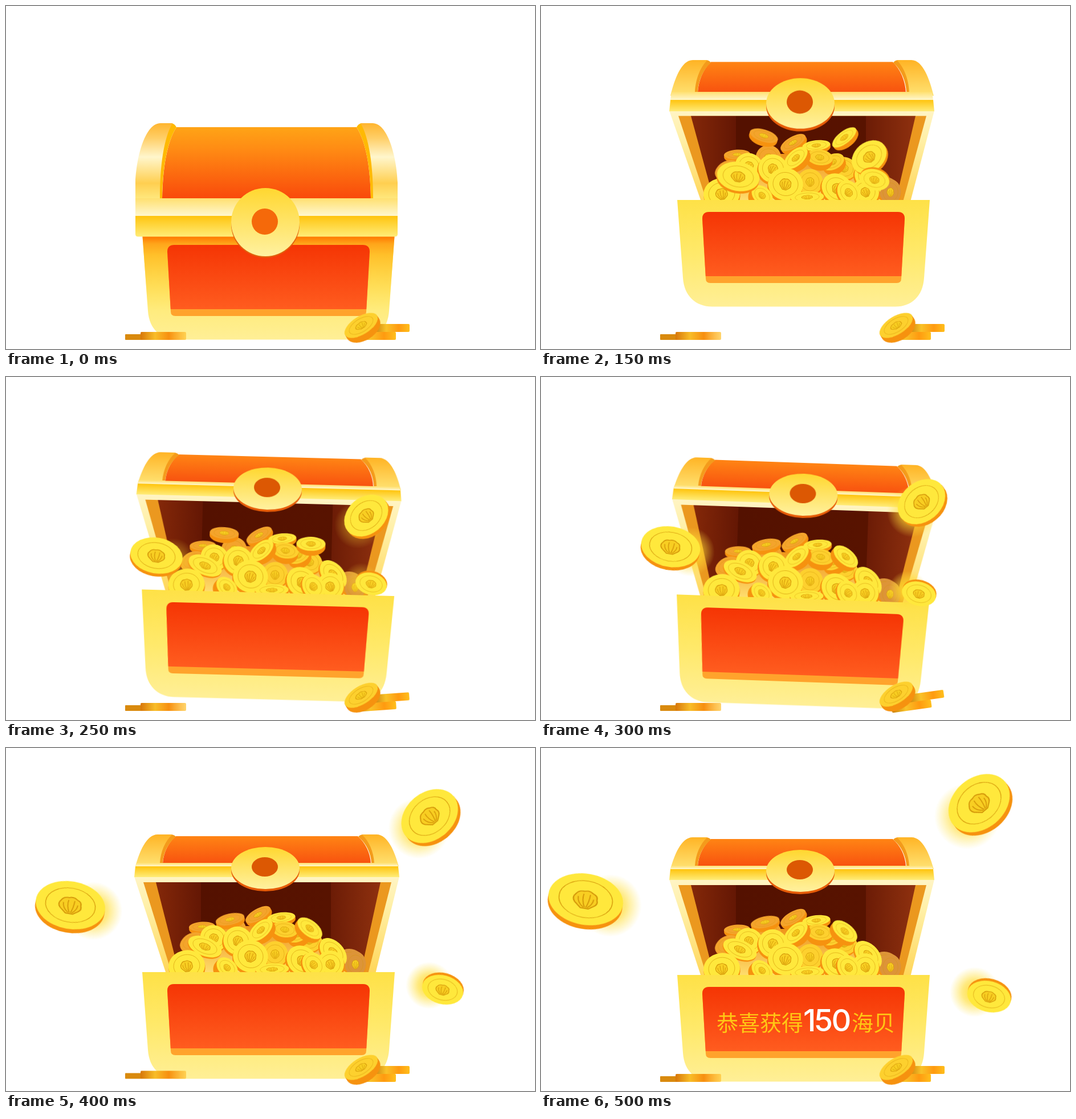
These frames come from a looping animation (928x603 px, 1500 ms). An HTML page without scripts:

```html
<!DOCTYPE html>
<html lang="zh">
<head>
<meta charset="utf-8">
<title>Treasure chest</title>
<style>
html, body { margin: 0; width: 100%; height: 100%; overflow: hidden; background: #fff; }
svg { display: block; width: 928px; height: 603px; color: #ffe83c; }

/* 50 ms ticks: steps(1) holds one tick, steps(2) adds a halfway pose */
.closed, .open, .prize, .chest, .lid, .fly, .glow, .hop, .bars, .tip, .jump {
  animation: 1.5s steps(1) infinite;
}
.closed { animation-name: closed; }
.open { animation-name: open; }
.prize { animation-name: prize; }
.chest { animation-name: chest; transform-origin: 458px 369px; }
.lid { animation-name: lid; }
.glow { animation-name: glow; }
.hop { animation-name: hop; }
.bars { animation-name: bars; transform-origin: 640px 572px; }
.tip { animation-name: tip; }
.back { animation-name: back; }
.side { animation-name: side; }
.left { animation-name: left; }
.right { animation-name: right; }
.small { animation-name: small; }

@keyframes closed { 0% { opacity: 1 } 6.66%, 100% { opacity: 0 } }
@keyframes open { 0% { opacity: 0 } 6.66%, 100% { opacity: 1 } }
@keyframes prize { 0% { opacity: 0 } 33.33%, 100% { opacity: 1 } }
@keyframes chest {
  0%, 6.66% { transform: translateY(-69.5px) rotate(-2deg) }
  10% { transform: translateY(-58px) rotate(0deg) }
  13.33% { transform: translateY(-30.5px) rotate(1deg); animation-timing-function: steps(2) }
  20% { transform: translateY(-9px) rotate(2deg); animation-timing-function: steps(2) }
  26.66% { transform: translateY(-5px) rotate(0deg); animation-timing-function: steps(2) }
  33.33%, 100% { transform: translateY(0) rotate(0deg) }
}
@keyframes lid {
  0%, 6.66% { transform: var(--a) }
  10% { transform: var(--b) }
  13.33%, 100% { transform: none }
}
@keyframes glow {
  0% { opacity: 0 }
  13.33% { opacity: 0; animation-timing-function: steps(2) }
  20%, 100% { opacity: 1 }
}
@keyframes hop {
  0%, 20% { transform: none; animation-timing-function: steps(2) }
  26.66% { transform: translateY(-5.5px); animation-timing-function: steps(2) }
  33.33%, 100% { transform: none }
}
@keyframes bars {
  0%, 13.33% { transform: rotate(0deg); animation-timing-function: steps(2) }
  20% { transform: rotate(-8deg); animation-timing-function: steps(2) }
  26.66%, 100% { transform: rotate(0deg) }
}
@keyframes tip {
  0%, 13.33% { transform: none; animation-timing-function: steps(2) }
  20% { transform: translateY(-4px); animation-timing-function: steps(2) }
  26.66%, 100% { transform: none }
}
@keyframes back {
  0%, 6.66% { transform: translate(386px, 301px) rotate(17deg) scale(.85, .36) }
  10% { transform: translate(391px, 286px) rotate(17deg) scale(.85, .36) }
  13.33% { transform: translate(369px, 286px) rotate(17deg) scale(.85, .36); animation-timing-function: steps(2) }
  20%, 100% { transform: translate(393px, 306px) rotate(-12deg) scale(.85, .33) }
}
@keyframes side {
  0%, 6.66% { transform: translate(531px, 308px) rotate(-38deg) scale(.85, .36) }
  10% { transform: translate(532px, 289px) rotate(-38deg) scale(.85, .36) }
  13.33% { transform: translate(534px, 300px) rotate(-38deg) scale(.85, .36); animation-timing-function: steps(2) }
  20%, 100% { transform: translate(533px, 322px) rotate(38deg) scale(.85, .46) }
}
@keyframes left {
  0%, 6.66% { transform: translate(369.5px, 302px) scale(.53) }
  10% { transform: translate(346px, 302px) scale(.57) }
  13.33% { transform: translate(300.5px, 332px) scale(.61); animation-timing-function: steps(2) }
  20% { transform: translate(227.5px, 301.5px) scale(.79); animation-timing-function: steps(2) }
  26.66% { transform: translate(113px, 280px) scale(.93); animation-timing-function: steps(2) }
  33.33%, 100% { transform: translate(78.5px, 270px) scale(1) }
}
@keyframes right {
  0%, 6.66% { transform: translate(551px, 278px) scale(.51) }
  10% { transform: translate(577px, 267px) scale(.57) }
  13.33% { transform: translate(598px, 270px) scale(.665); animation-timing-function: steps(2) }
  20% { transform: translate(669.5px, 221.5px) scale(.775); animation-timing-function: steps(2) }
  26.66% { transform: translate(745.5px, 122.5px) scale(.925); animation-timing-function: steps(2) }
  33.33%, 100% { transform: translate(771px, 100px) scale(1) }
}
@keyframes small {
  0%, 6.66% { transform: translate(570px, 310px) scale(.65) }
  10% { transform: translate(585px, 304px) scale(.68) }
  13.33% { transform: translate(618px, 345px) scale(.65); animation-timing-function: steps(2) }
  20% { transform: translate(663px, 379.5px) scale(.78); animation-timing-function: steps(2) }
  26.66% { transform: translate(766px, 423px) scale(.94); animation-timing-function: steps(2) }
  33.33%, 100% { transform: translate(786px, 435px) scale(1) }
}

.amber { color: #f4a42c; }
.gold { color: #fdd02e; }
.tan { color: #dd9438; }
text { font: 400 38px "Noto Sans CJK SC", "Noto Sans CJK", sans-serif; fill: #ffc814; }
.sum { font: 550 54px Inter, sans-serif; letter-spacing: -2.8px; fill: #fff; }
</style>
</head>
<body>
<svg viewBox="0 0 928 603" xmlns="http://www.w3.org/2000/svg">
<defs>
  <linearGradient id="frame" x2="0" y2="1"><stop stop-color="#fee147"/><stop offset=".5" stop-color="#ffe96a"/><stop offset="1" stop-color="#ffef96"/></linearGradient>
  <linearGradient id="panel" x2="0" y2="1"><stop stop-color="#f53504"/><stop offset="1" stop-color="#ff5c1f"/></linearGradient>
  <linearGradient id="shade" x2="0" y2="1"><stop stop-color="#ff7600"/><stop offset=".1" stop-color="#ffa51a"/><stop offset=".25" stop-color="#ffc02a"/><stop offset="1" stop-color="#ffd94e" stop-opacity="0"/></linearGradient>
  <linearGradient id="rail" x2="0" y2="1"><stop stop-color="#ffb52f"/><stop offset=".2" stop-color="#ffcf68"/><stop offset=".45" stop-color="#fff6cc"/><stop offset=".8" stop-color="#ffcf50"/><stop offset="1" stop-color="#ffe77c"/></linearGradient>
  <linearGradient id="dome" x2="0" y2="1"><stop stop-color="#ffa416"/><stop offset=".3" stop-color="#ff8c14"/><stop offset="1" stop-color="#f94a0b"/></linearGradient>
  <linearGradient id="dome2" x2="0" y2="1"><stop stop-color="#ff8414"/><stop offset="1" stop-color="#f8520f"/></linearGradient>
  <linearGradient id="rail2" x2="0" y2="1"><stop stop-color="#ffb425"/><stop offset="1" stop-color="#ffe374"/></linearGradient>
  <linearGradient id="pale" x2="0" y2="1"><stop stop-color="#ffe070"/><stop offset="1" stop-color="#fff8d2"/></linearGradient>
  <linearGradient id="band" x2="0" y2="1"><stop stop-color="#ffc40e"/><stop offset="1" stop-color="#ffec78"/></linearGradient>
  <linearGradient id="disc" x2="0" y2="1"><stop stop-color="#ffd730"/><stop offset="1" stop-color="#fff1a0"/></linearGradient>
  <linearGradient id="rim" x2="0" y2="1"><stop stop-color="#fff4c4"/><stop offset=".3" stop-color="#fff0a8"/><stop offset="1" stop-color="#ffd658"/></linearGradient>
  <linearGradient id="inner"><stop stop-color="#842809"/><stop offset=".2" stop-color="#641704"/><stop offset=".2" stop-color="#541100"/><stop offset=".78" stop-color="#581300"/><stop offset=".78" stop-color="#6c1c06"/><stop offset="1" stop-color="#8f310f"/></linearGradient>
  <linearGradient id="heap" x2="0" y2="1"><stop stop-color="#ef941a"/><stop offset="1" stop-color="#ffdf70"/></linearGradient>
  <linearGradient id="stack"><stop stop-color="#d8770a"/><stop offset=".32" stop-color="#f8bd28"/><stop offset=".62" stop-color="#f78f10"/><stop offset="1" stop-color="#ffc63c" stop-opacity=".75"/></linearGradient>
  <linearGradient id="stack2"><stop stop-color="#c9800c"/><stop offset=".35" stop-color="#f9c228"/><stop offset=".7" stop-color="#ff9a10"/><stop offset="1" stop-color="#ffbf1c"/></linearGradient>
  <radialGradient id="halo"><stop stop-color="#ffdc30"/><stop offset=".5" stop-color="#ffdc30" stop-opacity=".6"/><stop offset="1" stop-color="#ffe24a" stop-opacity="0"/></radialGradient>

  <path id="edge" d="M-30 0V5A30 30 0 0 0 30 5V0z" fill="#f6920f"/>
  <g id="face" stroke="#d39508">
    <circle r="30" fill="currentColor" stroke="none"/>
    <circle r="21.5" fill="none" stroke-width=".6"/>
    <g transform="scale(1.05 1.2)">
      <path d="M-3 9L-8 4Q-11 0-8-4Q-6-8-2-7.500Q2-9.500 5-6.500Q9-5 8.500-1Q10 3 7 5.500L3 9Z" fill="#f8ce22"/>
      <path d="M-1 8Q-6 4-6-2M0 8Q-3 1-2-5M1 8Q3 2 3-5M2 8Q6 4 6-1" fill="none" stroke-width=".8"/>
    </g>
  </g>
  <g id="coin"><use href="#edge"/><use href="#face"/></g>
  <g id="flat"><use href="#edge" transform="scale(1 1.25)" y="6"/><path d="M-30 0V9H30V0z" fill="#ec8210"/><use href="#face"/></g>

  <path id="front" d="M239 399H682L672 536C670 568 650 586.500 622 586.500H300C272 586.500 251 568 249 536Z" fill="url(#frame)"/>
  <g id="plate">
    <path d="M295 420H626Q638 420 638 432L632 537Q632 545 624 545H297Q289 545 289 537L283 432Q283 420 295 420Z" fill="#ffa32c"/>
    <path d="M295 420H626Q638 420 638 432L632.200 533H288.800L283 432Q283 420 295 420Z" fill="url(#panel)"/>
  </g>
  <g id="post">
    <path d="M280 206H290Q296 207 299 213C282 240 275 285 274 338H250V260Z" fill="#ffb904"/>
    <path d="M227 338V310C229 262 245 206 271 206H292C277 232 270 280 270 338Z" fill="url(#rail)"/>
  </g>
  <g id="post2">
    <path d="M276 157H288Q295 157 298 161C284 172 276 190 275 207H250Z" fill="#f49b1b"/>
    <path d="M227 213C234 188 246 157 266 157H292C279 168 271 188 270 207V213Z" fill="url(#rail2)"/>
  </g>
</defs>

<g class="closed">
  <use href="#front"/>
  <path d="M239.500 405H681.500L672 536H249Z" fill="url(#shade)"/>
  <use href="#plate"/>
  <path d="M274 338C275 285 282 240 299 213H615C632 240 639 285 640 338Z" fill="url(#dome)"/>
  <use href="#post"/>
  <use href="#post" transform="translate(914 0) scale(-1 1)"/>
  <path d="M227 338H687V370H227Z" fill="url(#pale)"/>
  <path d="M227 369H687V401Q687 405.500 682 405.500H232Q227 405.500 227 401Z" fill="url(#band)"/>
  <ellipse cx="455" cy="384" rx="60" ry="58.500" fill="#e2610c"/>
  <circle cx="455" cy="380" r="60" fill="url(#disc)"/>
  <circle cx="454" cy="379" r="23" fill="#f5690a"/>
</g>

<g class="open">
  <g class="chest">
    <g class="lid" style="--a:translateY(79px) scaleY(.802);--b:translateY(26.3px) scaleY(.934)">
      <path d="M225 231H690L648 402H281Z" fill="url(#rim)"/>
      <path d="M241 241H676L635 402H291Z" fill="#eb981f"/>
      <path d="M263 241H657L622 402H304Z" fill="url(#inner)"/>
    </g>

    <path d="M300 402L318 360L360 335L410 318H480L540 332L590 364L626 402Z" fill="url(#heap)"/>
    <g class="amber">
      <use href="#flat" transform="translate(344 319) rotate(-3) scale(.77 .28)"/>
      <use href="#coin" transform="translate(399 325) scale(.75)"/>
      <use href="#flat" transform="translate(442 298) rotate(-30) scale(.82 .34)"/>
      <g class="jump back"><use href="#flat"/></g>
      <use href="#coin" transform="translate(326 346) rotate(-30) scale(.75 .5)"/>
    </g>
    <g class="tan">
      <use href="#coin" transform="translate(605 378) rotate(20) scale(.8 .65)"/>
      <use href="#coin" transform="translate(613 385) scale(.62 .75)"/>
    </g>
    <use href="#flat" transform="translate(483 303) rotate(-6) scale(.82 .3)"/>
    <g class="gold">
      <use href="#coin" transform="translate(532 343) rotate(20) scale(.75 .65)"/>
      <use href="#flat" transform="translate(512 332) rotate(-25) scale(.7 .45)"/>
      <use href="#flat" transform="translate(489 324) rotate(8) scale(.78 .46)"/>
    </g>
    <g class="jump side"><use href="#flat"/></g>
    <use href="#coin" transform="translate(365 339) rotate(25) scale(.82 .74)"/>
    <use href="#flat" transform="translate(447 325) rotate(-42) scale(.83 .45)"/>
    <use href="#coin" transform="translate(407 344) rotate(30) scale(.87 .83)"/>
    <use href="#coin" transform="translate(349 354) rotate(22) scale(1.03 .55)"/>
    <use href="#coin" class="gold" transform="translate(472 367) scale(.75)"/>
    <use href="#coin" transform="translate(574 364) rotate(48) scale(.97 .62)"/>
    <use href="#coin" transform="translate(429 371) rotate(15) scale(1.03 .95)"/>
    <use href="#coin" transform="translate(317 388) rotate(-8) scale(1.07 .92)"/>
    <use href="#flat" transform="translate(388 391) rotate(42) scale(.7 .5)"/>
    <use href="#coin" transform="translate(520 379) rotate(40) scale(.98 .83)"/>
    <use href="#coin" transform="translate(569 385) rotate(-20) scale(.8)"/>
    <use href="#coin" transform="translate(540 386) rotate(55) scale(.78 .62)"/>
    <use href="#flat" transform="translate(467 394) rotate(-3) scale(.98 .34)"/>

    <use href="#front"/>
    <use href="#plate"/>

    <g class="lid" style="--a:translateY(-58.7px) scaleY(1.38);--b:translateY(-22.8px) scaleY(1.12)">
      <path d="M275 208C276 190 284 172 298 160H617C631 172 639 190 640 208Z" fill="url(#dome2)"/>
      <use href="#post2"/>
      <use href="#post2" transform="translate(916 0) scale(-1 1)"/>
    </g>
    <path class="lid" style="--a:translateY(-273.3px) scaleY(2.417);--b:translateY(-274px) scaleY(2.333)" d="M229 207H686L688 213.300H227Z" fill="url(#pale)"/>
    <path class="lid" style="--a:translateY(-22px) scaleY(1.237);--b:translateY(-1.2px) scaleY(1.053)" d="M227 213H688L690 232H225Z" fill="url(#band)"/>
    <g class="lid" style="--a:translateY(-32px) scaleY(1.32);--b:translateY(-30px) scaleY(1.2)">
      <ellipse cx="455" cy="220" rx="60" ry="37" fill="#e65c08"/>
      <ellipse cx="455" cy="216" rx="60" ry="37" fill="url(#disc)"/>
      <ellipse cx="454" cy="214" rx="23" ry="17" fill="#dc5803"/>
    </g>
  </g>

  <g class="fly left">
    <circle class="glow" cx="43" cy="7" r="55" fill="url(#halo)"/>
    <use href="#coin" transform="translate(0 -4) rotate(10) scale(2.2 1.5)"/>
  </g>
  <g class="fly right">
    <circle class="glow" cx="-23" cy="20" r="58" fill="url(#halo)"/>
    <use href="#coin" transform="translate(-2.500 -3) rotate(-40) scale(1.97 1.5)"/>
  </g>
  <g class="fly small">
    <circle class="glow" cx="-25" cy="-6" r="44" fill="url(#halo)"/>
    <g transform="translate(0 2) rotate(15)">
      <use href="#edge" transform="scale(1.3 -.9)"/>
      <use href="#face" transform="scale(1.3 .9)"/>
    </g>
  </g>
</g>

<g class="hop">
  <rect x="209" y="577" width="31" height="10" rx="1" fill="#d98a0e"/>
  <rect x="236" y="573" width="80" height="14" rx="2" fill="url(#stack)"/>
</g>
<g class="bars">
  <rect x="645" y="559" width="63" height="14" rx="2" fill="url(#stack2)"/>
  <rect x="614" y="573" width="70" height="14" rx="2" fill="url(#stack2)"/>
</g>
<g class="tip gold"><use href="#flat" transform="translate(623 561.500) rotate(-32) scale(1.1 .53)"/></g>

<g class="prize">
  <text x="308" y="497">恭喜获得</text>
  <text class="sum" x="460" y="498">150</text>
  <text x="545" y="497">海贝</text>
</g>
</svg>
</body>
</html>
```
